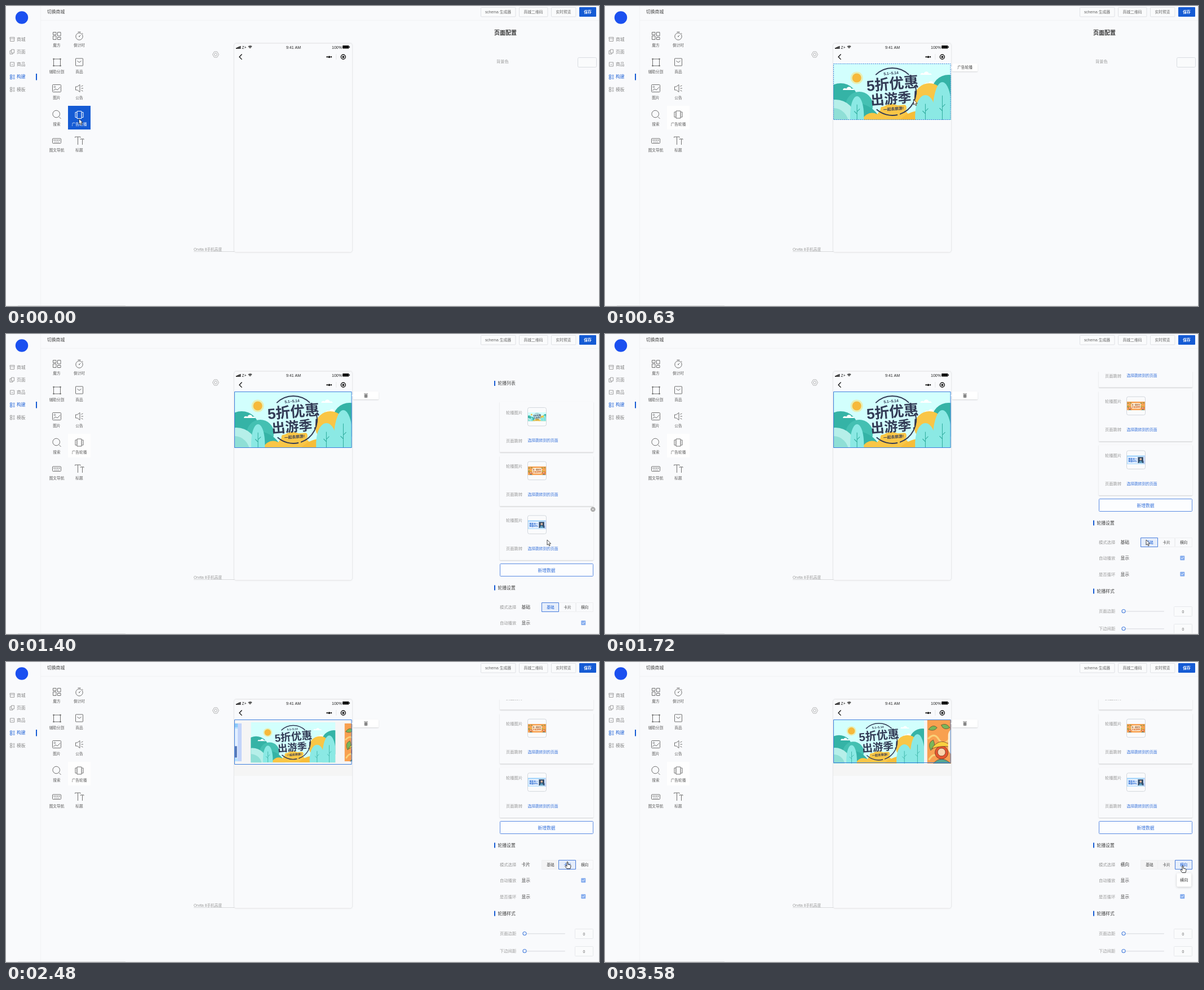
Animation, 1052 px wide and 532 px high, one loop 3650 ms. Source, as an HTML page with a canvas:

```html
<!DOCTYPE html>
<html lang="zh">
<head>
<meta charset="utf-8">
<title>页面构建</title>
<style>
html, body { margin: 0; width: 100%; height: 100%; overflow: hidden; background: #f9fafc; }
canvas { display: block; width: 1052px; height: 532px; }
</style>
</head>
<body>
<canvas id="stage" width="1052" height="532"></canvas>
<script>
const ctx = document.getElementById('stage').getContext('2d');
const LOOP = 3650, BLUE = '#155bd4', INK = '#444', GREY = '#999', BG = '#f9fafc', NAVY = '#323a55';
const FONT = '"Liberation Sans", "Noto Sans CJK SC", "Noto Sans CJK", sans-serif';

// Cursor stops: time, x, y. Each pose holds until the next.
const CURSOR = [
  [0, 129.5, 200], [80, 150, 202], [160, 246, 203], [235, 385, 188], [310, 500, 172], [390, 547.5, 166],
  [950, 575, 176], [1025, 660, 205], [1100, 738, 228], [1175, 830, 277], [1250, 905, 325], [1325, 948, 357],
  [1400, 960, 365], [1800, 975, 395], [1870, 984, 415], [1950, 986.5, 419], [2020, 988, 396],
  [2110, 991, 376], [2184, 994, 360], [2258, 996, 354], [2730, 1000, 355], [2805, 1012, 358],
  [2900, 1022, 359], [3200, 1024, 358], [3270, 1027, 350], [3350, 1026, 356], [3580, 1025, 361]
];

const held = (keys, t) => keys.filter(k => k[0] <= t).pop();

function text(s, x, y, size, color = INK, align = 'left', weight = 400) {
  ctx.font = `${weight} ${size}px ${FONT}`;
  ctx.textAlign = align;
  ctx.fillStyle = color;
  ctx.fillText(s, x, y + size * 0.37);
}
function rect(x, y, w, h, fill, stroke, r = 0, lw = 1) {
  ctx.beginPath();
  ctx.roundRect(x, y, w, h, r);
  paint(fill, stroke, lw);
}
function dot(x, y, r, fill, stroke, lw = 1) {
  ctx.beginPath();
  ctx.arc(x, y, r, 0, 7);
  paint(fill, stroke, lw);
}
function path(d, fill, stroke, lw = 1) {
  const p = new Path2D(d);
  if (fill) { ctx.fillStyle = fill; ctx.fill(p); }
  if (stroke) { ctx.strokeStyle = stroke; ctx.lineWidth = lw; ctx.stroke(p); }
}
function paint(fill, stroke, lw) {
  if (fill) { ctx.fillStyle = fill; ctx.fill(); }
  if (stroke) { ctx.strokeStyle = stroke; ctx.lineWidth = lw; ctx.stroke(); }
}
function group(x, y, draw) {
  ctx.save();
  ctx.translate(x, y);
  draw();
  ctx.restore();
}
function shadowBox(x, y, w, h, blur, alpha, r = 1, fill = '#fff', drop = 1) {
  ctx.save();
  ctx.shadowColor = `rgba(0,0,0,${alpha})`;
  ctx.shadowBlur = blur;
  ctx.shadowOffsetY = drop;
  rect(x, y, w, h, fill, null, r);
  ctx.restore();
}

// Tool icons, drawn around their own centre.
const TOOLS = [
  ['魔方', c => path('M-6.5-6.5h5.5v4.5h-5.5zM-6.5 0h5.5v6.5h-5.5zM1.5-6.5h5.5v6.5h-5.5zM1.5 2.5h5.5v4h-5.5z', null, c)],
  ['倒计时', c => { dot(0, 1, 6.2, null, c); path('M-2.5-7h5M0 1l2.5-2.5M5-5l1.5 1.5', null, c); dot(0, 1, .9, c); }],
  ['辅助分割', c => {
    rect(-5.5, -5.5, 12, 12, null, c);
    for (const x of [-5.5, 6.5]) for (const y of [-5.5, 6.5]) dot(x, y, 1.3, c);
  }],
  ['商品', c => { rect(-6.5, -6.5, 13, 13, null, c, .5); path('M-3.5-2.5Q0 3 3.5-2.5', null, c); }],
  ['图片', c => { rect(-7.5, -6.5, 15, 13, null, c, 1); dot(-3.5, -2.5, 1.4, null, c, .8); path('M-6 4l4-3 3 2 5-5', null, c); }],
  ['公告', c => { path('M-6.5-3h3l4.5-3.5v13l-4.5-3.5h-3zM3.5-3.5l3-1.5M3.5 0h3.5M3.5 3.5l3 1.5', null, c); }],
  ['搜索', c => { dot(-.8, -1, 6.3, null, c); path('M4 4l3.5 3.5', null, c); }],
  ['广告轮播', c => { rect(-4, -6.5, 8, 13, null, c, 1, 1.2); path('M-5-4.5h-2v9h2M5-4.5h2v9h-2', null, c); }],
  ['图文导航', c => {
    rect(-7.5, -4, 15, 8.5, null, c, 1);
    for (let i = 0; i < 4; i++) dot(-4.5 + i * 3, -1, .9, c);
    path('M-5 2.2h10', null, c, .6);
  }],
  ['标题', c => path('M-7.5-5.5v-1.5h9.5v1.5M-2.5-7v14M2.5-2v-1.2h5.5v1.2M5.5-3v10', null, c)]
];

function tool(i, x, y, color, label = color) {
  group(x, y, () => TOOLS[i][1](color));
  text(TOOLS[i][0], x, y + 17, 6.7, label, 'center');
}
function blueTile(x, y) {
  rect(x, y, 40, 42, BLUE);
  tool(7, x + 20, y + 16, '#fff');
}

function chrome(t) {
  rect(0, 0, 1052, 532, BG);
  rect(61, 0, 1, 531, '#f1f2f4');
  rect(62, 25, 990, 1, '#f1f2f4');
  rect(0, 531, 1052, 1, '#eceded');
  rect(21, 531, 191, 1, '#d6d7d8');
  dot(28, 20.5, 11.2, '#1b50f0');
  text('切换商城', 73, 10.5, 7.8);

  ['商城', '页面', '商品', '构建', '模板'].forEach((name, i) => {
    const y = 59 + i * 22.2, c = i === 3 ? BLUE : '#888';
    text(name, 19, y, 7.8, c);
    group(11, y, () => path([
      'M-3.5-1v4.5h7v-4.5M-4-3.5h8v2.5h-8z', 'M-1.5-4h5v6h-5zM-1.5-2h-2.5v6h5v-2',
      'M-3.5-3.5h7v7h-7zM-1.5-.5L0 1l1.5-1.5'
    ][i] || 'M-3.5-3.5h3v3h-3zM-3.5 1h3v3h-3zM1.5-3h3M1.5-1h3M1.5 1.5h3M1.5 3.5h3', null, c, .8));
  });
  rect(53, 120, 2, 11.5, BLUE);

  [['schema 生成器', 842, 62], ['商城二维码', 910, 51], ['实时预览', 967, 44]].forEach(([s, x, w]) => {
    rect(x + .5, 2.5, w - .5, 16.5, '#fafbfc', '#dfe1e5', 1);
    text(s, x + w / 2, 10.5, 6.8, '#666', 'center');
  });
  rect(1017, 2, 30, 17, BLUE, null, 1);
  text('保存', 1032, 10.5, 6.8, '#fff', 'center', 700);

  if (t >= 560) rect(110, 177, 40, 42, '#fefefe');
  TOOLS.forEach((_, i) => {
    if (i !== 7 || t >= 560) tool(i, 90 + i % 2 * 40, 53 + (i >> 1) * 46.5, '#707070', '#5c5c5c');
  });
  if (t < 560) blueTile(110, 177);

  path('M366.5 86l3-5h5l3 5-3 5h-5z', null, '#aaa', .9);
  dot(372, 86, 2.4, null, '#aaa', .9);
  text('Orvita 8手机高度', 333, 432, 6.7, '#999');
  rect(333, 435, 72, 1, '#d8d9db');
}

function phone() {
  shadowBox(405, 66.5, 209, 370, 2.5, .22, 4, BG, 0);
  for (let i = 0; i < 4; i++) rect(408 + i * 2.2, 74 - i, 1.7, 2 + i, '#111');
  text('Z+', 418.5, 73, 6.8, '#222');
  for (const r of [1.2, 2.9, 4.6]) {
    ctx.beginPath();
    ctx.arc(433, 75.5, r, -2.35, -.8);
    paint(null, '#111', 1.1);
  }
  text('9:41 AM', 510, 73, 7, '#222', 'center');
  text('100%', 578, 73, 7, '#222');
  rect(597, 70, 11.5, 5.5, '#111', null, 1);
  rect(609, 71.5, 1, 2.5, '#111');
  path('M418.5 85.5l-4.5 4.7 4.5 4.7', null, '#111', 1.3);
  dot(569.7, 90.3, 1.2, '#111');
  dot(573.3, 90.3, 1.9, '#111');
  dot(576.9, 90.3, 1.2, '#111');
  rect(585.5, 85, .7, 10, '#e0e0e0');
  dot(598.3, 90.3, 4, null, '#111', 1.4);
  dot(598.3, 90.3, 1.9, '#111');
}

// Banner art lives in a 208 x 100 space.
function tree(x, y, rx, ry) {
  path(`M${x - rx} ${y + ry}C${x - rx * 1.1} ${y - ry * .2} ${x - rx * .6} ${y - ry} ${x} ${y - ry}S${x + rx * 1.1} ${y - ry * .2} ${x + rx} ${y + ry}z`, '#8be9e4');
  path(`M${x} ${y - ry * .3}V${y + ry}M${x} ${y + ry * .3}l5-5M${x} ${y + ry * .5}l-5-5`, null, '#35b0a3', 1.1);
}
function cloud(x, y) {
  path(`M${x} ${y}c0-4 5-4 6-2 2-6 9-4 9 0 3-1 5 0 5 2z`, '#fff');
}
function travelBanner() {
  rect(0, 0, 208, 100, '#d2fffd');
  dot(41.5, 25.5, 11, '#e6efb6');
  dot(41.5, 25.5, 8, '#f6b93b');
  cloud(154, 20);
  cloud(162, 37);
  dot(204, 50, 30, '#35b3a6');
  dot(170, 62, 27, '#f9c646');
  dot(13, 66, 31, '#35b3a6');
  dot(46, 74, 24, '#44c0b2');
  path('M22 100Q30 66 52 72T84 100z', '#35b3a6');
  cloud(17, 47);
  dot(4, 100, 36, '#b6efe9');
  dot(0, 106, 27, '#8fdfd6');
  path('M50 100Q62 82 78 90Q90 70 106 72Q124 74 140 100z', '#f9c646');
  path('M118 100Q140 74 208 84V100z', '#f7bd38');
  tree(42, 79, 12, 21);
  tree(163, 78, 18, 22);
  tree(193, 67, 17, 34);
  for (const [a, b] of [[-2.35, -.8], [-.28, 1.25], [1.35, 2.3]]) {
    ctx.beginPath();
    ctx.arc(104.5, 50, 42, a, b);
    paint(null, NAVY, 2);
  }
  group(104, 50, () => {
    ctx.rotate(-.085);
    text('5.1–5.14', 1, -33, 6.8, NAVY, 'center', 700);
    text('5折优惠', 2, -14.5, 26, NAVY, 'center', 700);
    text('出游季', -3, 12, 24, NAVY, 'center', 700);
    path('M40 2l4 .4-3.5 12-2-.3z', NAVY);
    dot(37.5, 18, 1.6, NAVY);
    rect(-23, 25, 46, 10, '#f9c646', null, 4);
    text('一起去旅游!', 0, 30.5, 6.8, NAVY, 'center', 700);
  });
}
function springBanner() {
  rect(0, 0, 208, 100, '#f8a050');
  for (const x of [0, 150]) group(x, 0, () => {
    path('M3 22q10-14 20-4-8 10-20 4zM8 70q-8-18 6-24 8 16-6 24zM32 12q12-6 20 6-14 8-20-6z', '#79b65a', '#6b4028', .9);
    path('M2 44q14-16 24 0t24 2M4 92q10-18 22-8', null, '#f9d27a', 4);
    dot(33, 75, 15, '#e6552f', '#6b4028');
    dot(33, 74, 9, '#fbd5ad', '#6b4028');
    path('M10 66q22-30 46-4-24-4-46 4z', '#f9d13f', '#6b4028');
    path('M14 100q18-20 40 0z', '#55a692', '#6b4028');
  });
  rect(48, 18, 112, 64, '#fdf0d7', null, 18);
  text('五一春日行', 104, 37, 20, '#934d25', 'center', 700);
  text('享春游嗨购', 104, 63, 20, '#d66427', 'center', 700);
}
function sportBanner() {
  rect(0, 0, 208, 100, '#b9e2ff');
  rect(0, 0, 208, 10, '#8ccafa');
  rect(8, 14, 192, 78, '#e4f0ff', null, 5);
  text('健身五一', 66, 37, 25, '#2466d0', 'center', 700);
  text('钜惠好礼', 66, 67, 25, '#2466d0', 'center', 700);
  rect(126, 18, 62, 70, '#334d6a');
  dot(158, 42, 13, '#d8b49b');
  path('M136 88q20-54 44 0z', '#5e9fc0');
  path('M190 60h6v30h-6z', '#5779b8');
  path('M198 0h10v100h-10z', '#c3d4fa');
}
function picture(art, x, y, w, h) {
  group(x, y, () => {
    ctx.scale(w / 208, h / 100);
    ctx.beginPath();
    ctx.rect(0, 0, 208, 100);
    ctx.clip();
    art();
  });
}

function carousel(t, mode) {
  if (t < 390) return;
  ctx.save();
  ctx.beginPath();
  ctx.rect(405, 102, 209, 101);
  ctx.clip();
  const height = [100, 80, 77.5][mode];
  if (mode) rect(405, 102, 209, 100, '#f5f5f5');
  if (mode === 0) picture(travelBanner, 405, 102, 208.5, 100);
  if (mode === 1) {
    const s = held([[0, .85], [2480, .9], [2555, .94], [2630, .97], [2730, 1]], t)[1];
    picture(sportBanner, 276, 108.7, 142, 67.5);
    picture(springBanner, 600.5, 108.7, 142, 67.5);
    picture(travelBanner, 509.3 - 83.3 * s, 142.5 - 39.7 * s, 166.6 * s, 79.4 * s);
  }
  if (mode === 2) {
    picture(travelBanner, 405, 102.5, 161, 77.5);
    picture(springBanner, 571.5, 102.5, 161, 77.5);
  }
  ctx.restore();
  if (t < 560) return;
  if (t < 950) ctx.setLineDash([2, 1.5]);
  rect(405.5, 102.5, 207.5, Math.floor(height) - 1, null, '#3f7fdc');
  ctx.setLineDash([]);
  shadowBox(616, 102, 45, 14, 2, .15);
  path('M613 109l3-2v4z', '#fff');
  if (t < 950) return text('广告轮播', 638.5, 109, 6.7, INK, 'center');
  rect(635.7, 107, 5.6, 6, '#888', null, 1);
  rect(635, 105.3, 7, 1.1, '#888');
}

function section(name, y) {
  rect(866, y - 4.5, 2, 9, BLUE);
  text(name, 872.5, y, 7.8);
}
function setting(name, value, y) {
  text(name, 876, y, 7.3, GREY);
  text(value, 914.5, y, 7.8);
}
function panel(t, mode, hover) {
  if (t < 950) {
    text('页面配置', 886, 47.5, 10, '#333', 'center', 700);
    text('背景色', 870, 98, 7.2, GREY);
    rect(1014.5, 91.5, 33, 17, '#fafbfc', '#d9dce1', 2);
    return;
  }
  const scroll = held([[0, 0], [1500, 18], [1575, 55], [1650, 92], [1720, 115], [1800, 125]], t)[1];
  ctx.save();
  ctx.beginPath();
  ctx.rect(860, 67, 192, 464);
  ctx.clip();
  ctx.translate(0, -scroll);
  section('轮播列表', 87.5);
  [travelBanner, springBanner, sportBanner].forEach((art, i) => {
    const y = 120 + i * 95.7;
    shadowBox(876, y, 166, 89.5, 2, .17, 1, BG, 1.2);
    text('轮播图片', 887, y + 19, 7.3, GREY);
    rect(925.5, y + 10.5, 33, 32.5, '#fafbfc', '#d3d7dd', 3);
    picture(art, 926, y + 19, 32, 15.5);
    text('页面跳转', 887, y + 69, 7.3, GREY);
    text('选择跳转到的页面', 925.5, y + 69, 6.75, '#3470da');
  });
  if (t >= 1325 && t < 1575) {
    dot(1041.3, 311, 4.3, '#aaa');
    path('M1039.8 309.5l3 3m0-3l-3 3', null, '#fff', .9);
  }
  rect(876.5, 407.5, 165, 22, '#fcfdff', '#5a8ae2', 1);
  text('新增数据', 959, 418.7, 7.8, '#3470da', 'center');

  section('轮播设置', 450);
  const modes = ['基础', '卡片', '横向'];
  const modeBox = (i, fill, stroke) => rect(950.5 + Math.round(i * 30.3), 476.5, 30, 16, fill, stroke);
  setting('模式选择', modes[mode], 484.5);
  const lit = i => i === mode || i === hover;
  modes.forEach((_, i) => lit(i) || modeBox(i, i < mode ? '#f4f4f5' : BG, '#eeeff1'));
  modes.forEach((s, i) => {
    if (lit(i)) modeBox(i, '#e6eefb', '#4a7edc');
    text(s, 966 + i * 30.3, 484.5, 6.7, lit(i) ? BLUE : INK, 'center');
  });
  [['自动播放', 512.5], ['是否循环', 541]].forEach(([s, y]) => {
    setting(s, '显示', y);
    rect(1020.3, y - 4.3, 8, 8, '#86adee', null, 1);
    path(`M1022 ${y - .5}l1.7 1.7 3-3.2`, null, '#fff', 1);
  });
  section('轮播样式', 571);
  [['页面边距', 606.5], ['下边间距', 637.5]].forEach(([s, y]) => {
    text(s, 876, y - .5, 7.3, GREY);
    rect(922, y - .5, 70, 1.5, '#e1e3e7', null, 1);
    dot(920, y, 3, '#fff', '#4a80dd', 1.1);
    rect(1009.5, y - 8, 32, 17, '#fafbfc', '#e6e8eb', 1);
    text('0', 1025.3, y + .5, 6.8, '#666', 'center');
  });
  ctx.restore();
}

function tooltip(t) {
  if (t < 2730) return;
  const [s, x] = t < 3050 ? ['卡片', 996.8] : ['横向', 1027.3];
  shadowBox(x - 13, 374.5, 26, 24, 4, .2, 2);
  text(s, x, 386, 7.3, INK, 'center');
}

function pointer(x, y, hand) {
  ctx.lineJoin = 'round';
  group(x, y, () => hand
    ? path('M-1 1Q0-.6 1 1V5L5 5.8Q6.2 6.2 6 8L5 12.5H-1L-4 8.5Q-4 6.8-2.5 7.2L-1 8.5z', '#fff', '#222', .9)
    : path('M0 0V9.2L2.1 7.3 3.7 10.8 5.2 10.1 3.7 6.8H6.6z', '#fff', '#222', .8));
  ctx.lineJoin = 'miter';
}

function draw(t) {
  const [, x, y] = held(CURSOR, t);
  const mode = t < 2407 ? 0 : t < 3500 ? 1 : 2;
  const hand = t >= 2184;
  const hover = hand ? (x < 1011.5 ? 1 : 2) : -1;
  chrome(t);
  phone();
  carousel(t, mode);
  panel(t, mode, hover);
  tooltip(t);
  if (t >= 80 && t < 560) {
    ctx.globalAlpha = .5;
    blueTile(x - 20, y - 23);
    ctx.globalAlpha = 1;
  }
  pointer(x, y, hand);
}

function tick() {
  draw(performance.now() % LOOP);
  requestAnimationFrame(tick);
}
tick();
</script>
</body>
</html>
```
